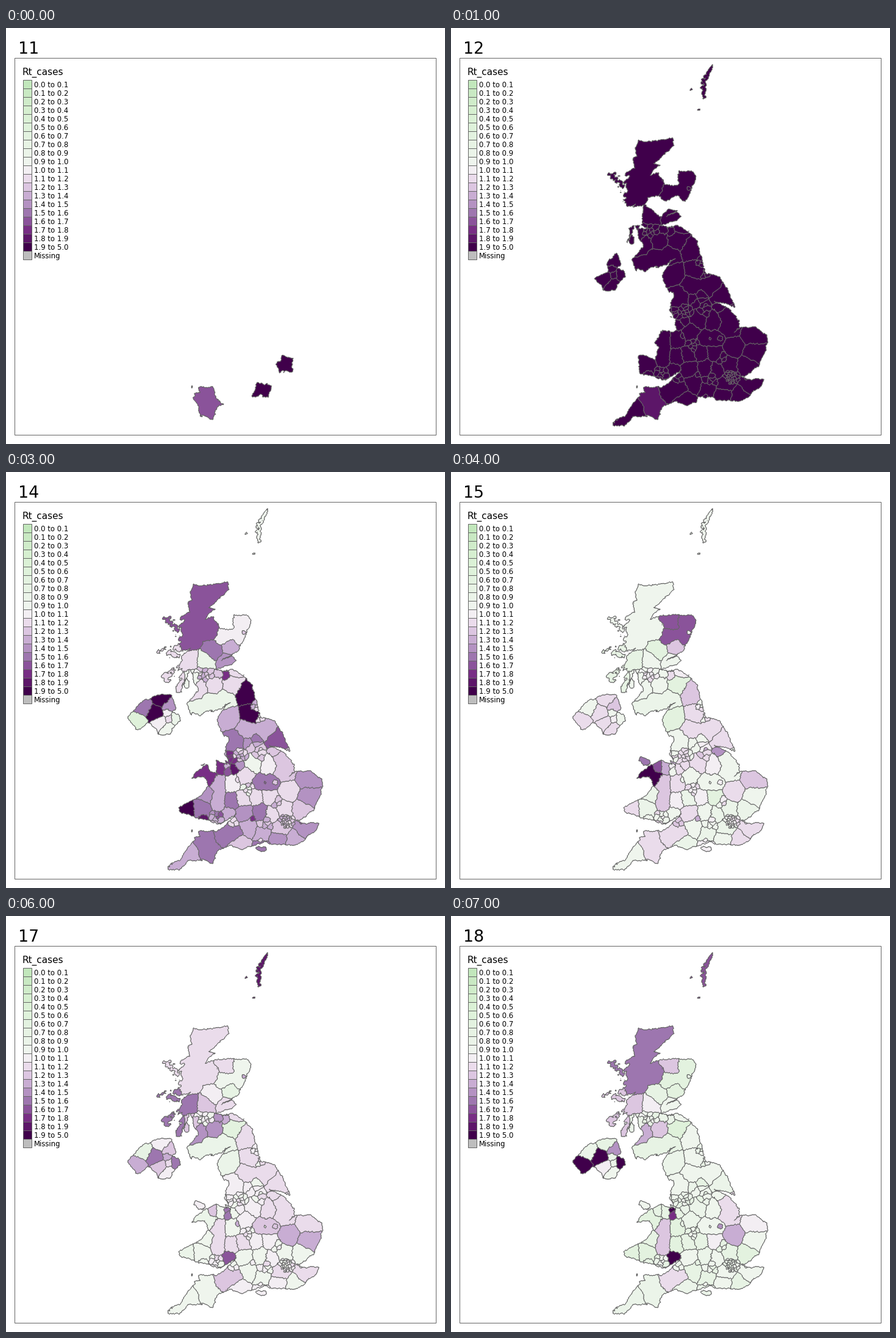
Animation of 720 by 681 pixels, one loop 8 s. Source, as a matplotlib script:

```python
import numpy as np
import matplotlib.pyplot as plt
from matplotlib.animation import FuncAnimation
from matplotlib.colors import LinearSegmentedColormap
from matplotlib.patches import Rectangle
from matplotlib.path import Path

W, H, DPI = 720, 681, 100
X0, X1, Y0, Y1, S = 192, 528, 54, 660, 3   # map window and supersampling
WEEKS = range(11, 19)
NONE = -1                                  # no data that week
USUAL = {11: NONE, 12: 19, 13: 19, 14: 12, 15: 10, 16: 10, 18: 8}
GREY = (0.4, 0.4, 0.4)
rng = np.random.default_rng(5)

# Diverging scale: 10 green classes below 1.0 and 10 purple ones above
purple = LinearSegmentedColormap.from_list(
    "p", ["#f7f7f7", "#e7d4e8", "#c2a5cf", "#9970ab", "#762a83", "#40004b"])
green = LinearSegmentedColormap.from_list("g", ["#f7f7f7", "#d9f0d3", "#a6dba0"])
SCALE = [green((0.25 + 0.133 * i) / 2)[:3] for i in range(9, -1, -1)]
SCALE += [purple((0.25 + 4.75 * i / 9) / 5)[:3] for i in range(10)]

rows, cols = (Y1 - Y0) * S, (X1 - X0) * S
gy, gx = np.mgrid[0:rows, 0:cols] / S
gx, gy = gx + X0, gy + Y0


def noise(cell, amp):
    """Smooth random field that changes over the given number of samples."""
    grid = rng.uniform(-amp, amp, (rows // cell + 2, cols // cell + 2))
    y, x = np.arange(rows) / cell, np.arange(cols) / cell
    iy, ix = y.astype(int), x.astype(int)
    fy, fx = (y - iy)[:, None], x - ix
    mix = grid[iy] * (1 - fy) + grid[iy + 1] * fy
    return mix[:, ix] * (1 - fx) + mix[:, ix + 1] * fx


# Bend the samples so that straight sides turn ragged; the west has sea lochs
west = np.clip((300 - gx) / 15, 0, 1) * np.clip((gy - 195) / 15, 0, 1) * np.clip((355 - gy) / 15, 0, 1)
wx = gx + (1 + west) * (noise(6, 1.3) + noise(20, 1.2))
wy = gy + (1 + west) * (noise(6, 1.3) + noise(20, 1.2))
loch = 2.5 * west * np.sin(0.6 * gy + 0.4 * gx)

land = np.zeros((rows, cols), bool)


def coast(*xy):
    pts = np.reshape(xy, (-1, 2))
    lo = ((pts.min(0) - (X0 + 9, Y0 + 9)) * S).astype(int).clip(0)
    hi = ((pts.max(0) - (X0 - 9, Y0 - 9)) * S).astype(int)
    box = np.s_[lo[1]:hi[1], lo[0]:hi[0]]
    bent = np.column_stack([(wx + loch)[box].ravel(), wy[box].ravel()])
    land[box] |= Path(pts).contains_points(bent).reshape(wx[box].shape)


def isle(x, y, rx, ry, tilt=0):
    t = np.linspace(0, 2 * np.pi, 16)
    u, v, a = rx * np.cos(t), ry * np.sin(t), np.radians(tilt)
    coast(np.column_stack([x + u * np.cos(a) - v * np.sin(a), y + u * np.sin(a) + v * np.cos(a)]))


# Scotland and the far north of England
coast(308,183, 317,186, 340,184, 365,180, 364,192, 348,209, 332,222, 343,224, 331,234,
      327,241, 345,235, 372,234, 397,235, 402,243, 395,262, 387,281, 379,294, 370,300,
      352,308, 370,302, 377,309, 368,316, 342,322, 358,327, 372,323, 390,334, 404,350,
      411,381, 418,402, 375,428, 364,432, 357,431, 345,406, 357,386, 368,377, 345,391,
      328,391, 318,398, 306,393, 304,398, 296,379, 302,372, 316,356, 306,340, 307,329,
      322,328, 310,321, 306,332, 301,323, 297,335, 293,340, 286,361, 278,360, 287,330,
      290,320, 281,326, 288,303, 303,288, 284,295, 270,286, 286,278, 280,268, 290,268,
      284,250, 292,244, 287,238, 301,229, 298,215, 304,210, 302,198)
# England and Wales
coast(364,430, 375,420, 418,402, 441,408, 454,428, 465,457, 452,451, 432,447, 455,458,
      471,478, 473,490, 463,499, 474,490, 497,489, 517,503, 520,514, 511,537, 503,553,
      486,567, 476,571, 492,575, 512,574, 511,585, 499,593, 488,603, 472,611, 434,609,
      424,604, 418,608, 398,613, 386,618, 366,611, 345,620, 342,632, 338,640, 322,635,
      300,635, 285,651, 266,650, 266,645, 286,634, 297,617, 310,603, 308,597, 318,596,
      316,587, 346,588, 360,577, 378,560, 350,576, 333,570, 315,566, 303,563, 287,558,
      283,549, 300,540, 322,528, 331,512, 326,498, 304,501, 311,492, 326,480, 345,472,
      362,479, 358,471, 366,474, 359,462, 361,448, 366,440)
# Northern Ireland
coast(200,402, 209,390, 226,372, 236,371, 247,364, 270,364, 279,387, 272,394, 285,398,
      285,407, 272,421, 270,429, 248,429, 246,420, 232,408, 220,422, 213,421, 205,410)
isle(265, 242, 8, 5, 45)
isle(276, 253, 11, 4, 55)
isle(274, 298, 10, 5, 20)
isle(254, 292, 10, 2, -25)
isle(264, 335, 6, 8)
isle(272, 328, 2.5, 10, 25)
isle(296, 347, 4.5, 8)
isle(317, 473, 9, 6, 30)
isle(419, 617, 9, 4)
isle(304, 587, 1.2, 2)
isle(393, 100, 1.5, 1.5)
isle(406, 133, 1.5, 1.5)
# Shetland: a string of islets, widest in the middle
for t in np.linspace(0, 1, 22):
    spread = 9 * np.sin(np.pi * t) ** 2
    isle(415 + 11 * t ** 2 + rng.uniform(-spread, spread / 2), 113 - 48 * t, 2.2, rng.uniform(2, 4.5), 20)

points, owners, classes = [], [], [[NONE] * len(WEEKS)]


def place(*xy, size=15, first=12, **known):
    """An area around its points; known holds classes like w14=16."""
    val = {}
    for w, usual in USUAL.items():
        shade = usual + (int(rng.integers(-1, 2)) if w > 13 else 0)
        val[w] = known.get(f"w{w}", shade if w >= first else NONE)
    val[17] = (val[16] + val[18]) // 2 + 1
    for x, y in np.reshape(xy, (-1, 2)):
        points.append((x, y, size))
        owners.append(len(classes))
    classes.append([val[w] for w in WEEKS])


def cluster(x, y, radius, n, **known):
    """A conurbation: n small areas spread over a disc in a sunflower pattern."""
    for k in range(n):
        r, a = radius * np.sqrt((k + 0.5) / n), 2.4 * k + rng.uniform(-0.4, 0.4)
        vary = {w: int(np.clip(v + rng.integers(-2, 3), 6, 19)) for w, v in known.items()}
        place(x + r * np.cos(a), y + r * np.sin(a), size=1.6 * radius / np.sqrt(n), **vary)


# Scotland
place(415, 90, w14=9, w15=9, w16=19, w18=16)
place(325, 205, 310, 240, 335, 258, 300, 275, 265, 245, w13=13, w14=16, w15=9, w16=5, w18=15)
place(302, 308, 283, 345, 270, 297, 264, 335, first=14, w15=7, w16=17, w18=12)
place(360, 246, first=15, w15=16, w16=9, w18=12)
place(386, 248, 382, 270, 358, 269, w14=10, w15=16, w16=11, w18=6)
place(390, 263, size=4, w16=17)
place(369, 286, first=14, w14=13, w15=12, w16=6, w18=6)
place(340, 292, first=14, w14=15, w15=6, w16=11)
place(325, 310, w14=8, w15=9, w16=12, w18=10)
place(362, 310, w14=14, w15=9, w16=11)
cluster(326, 330, 12, 10)
place(297, 348, 309, 338, w14=9, w15=9, w16=15)
place(308, 366, 318, 350, w15=9, w16=14, w18=13)
place(340, 348, w15=9, w16=14, w18=12)
place(310, 380, 335, 376, 358, 372, w14=8, w15=8, w16=8)
place(370, 347, w14=11, w15=6, w16=6, w18=5)
place(376, 328, size=10)
place(361, 335, size=7, w13=17, w14=17, w16=17)
place(347, 331, size=7, w16=19)

# Northern England
place(395, 362, w14=19, w15=12, w16=11)
place(400, 397, w14=19, w16=11)
cluster(408, 383, 6, 4)
place(367, 402, w13=15, w14=13, w15=6, w16=6)
place(395, 420, 425, 420, w14=13, w16=12)
cluster(418, 404, 5, 3)
place(445, 440, w14=16, w15=11, w16=12)
place(376, 440, w14=15, w15=9)
cluster(407, 446, 12, 5, w14=14)
cluster(415, 460, 9, 4, w15=13)
place(442, 456, size=10, w15=14)
place(452, 470, 456, 488, w18=11)
place(428, 480, w14=10, w16=11)
place(408, 478, w13=14, w14=9, w16=11)
cluster(378, 480, 9, 3, w14=16)
cluster(384, 464, 10, 10)
cluster(364, 466, 7, 5, w14=15)

# Midlands and the east
place(394, 498, w13=16, w14=11, w16=11)
place(370, 510, w14=10, w16=11, w18=6)
place(379, 504, size=5, w16=18)
place(389, 535, w14=11, w15=8, w16=14)
place(370, 538, w13=12, w14=15, w16=14, w18=6)
place(410, 532, w13=16, w14=11, w16=12)
cluster(396, 518, 9, 7, w13=17, w14=10)
place(416, 508, 432, 510, w13=8, w14=15, w15=9, w16=13)
place(424, 509, size=4, w13=8, w14=16)
place(432, 530, w15=6, w16=8, w18=10)
place(495, 503, w14=14, w15=12, w18=10)
place(497, 531, w13=17, w14=14, w16=16)
place(462, 523, w13=15, w18=13)
place(440, 508, size=6, w13=11, w18=14)
place(485, 553, w13=18, w15=8, w16=11, w18=6)
place(455, 552, w11=19, w13=17, w14=11, w15=8)
cluster(446, 543, 7, 3, w13=14)

# Southern England
place(436, 560, w13=16, w14=11, w15=8)
place(418, 557, w13=18, w14=15, w15=9, w16=8)
place(390, 557, w14=14, w15=11, w16=8)
place(398, 582, w13=15, w14=13, w16=9)
place(404, 568, size=5, w14=17, w15=13)
cluster(426, 575, 9, 5, w13=14)
cluster(374, 575, 6, 3, w15=13)
place(355, 592, 374, 592, w13=18, w14=15, w15=11, w16=12, w18=11)
place(383, 609, w13=18, w15=8, w16=11)
place(330, 600, 335, 622, w11=16, w12=18, w14=15, w15=11, w16=9, w18=8)
place(297, 628, 280, 640, w14=13, w15=9, w16=9, w18=8)
place(420, 590, w11=19, w13=16, w15=8)
place(417, 603, size=4)
place(420, 617, first=14, w14=15)
place(450, 583, w13=15, w15=8, w16=12)
place(447, 600, w13=16, w14=14, w15=9)
place(473, 602)
place(490, 583, w14=14, w15=11, w16=11)
place(484, 574, size=4, w14=16)
cluster(460, 571, 11, 30, w13=15)

# Wales
place(317, 472, first=15, w15=15)
place(333, 500, 316, 494, 325, 486, first=14, w14=17, w15=19, w16=9, w18=6)
place(338, 481, first=15, w15=16, w16=15)
place(352, 481, first=14, w14=17, w15=13)
place(359, 481, size=8, first=14, w18=19)
place(362, 489, size=8, first=14, w14=16, w18=17)
place(348, 510, 348, 537, w15=12, w16=9, w18=12)
place(327, 530, first=14, w14=14, w15=8)
place(296, 550, first=14, w14=19, w16=8, w18=6)
place(320, 548, w14=15, w15=8, w18=6)
cluster(345, 565, 9, 8, w13=15, w14=14)
place(323, 565, size=6, w14=18)
place(366, 557, size=10, w13=10, w18=19)

# Northern Ireland
place(215, 408, first=14, w14=5, w16=5, w18=19)
place(226, 386, first=14, w14=15, w15=9, w16=5)
place(256, 372, first=14, w14=19, w15=11, w16=12)
place(244, 395, first=14, w14=19, w15=11, w16=9, w18=19)
place(268, 383, w13=17, w14=14, w15=12, w18=14)
place(264, 393, size=9, w14=10, w16=16)
place(267, 404, size=8, w13=16, w16=13)
place(253, 411, w14=10, w15=11, w16=12, w18=10)
place(264, 420, w14=9, w15=11, w16=9)
place(281, 404, w14=8, w18=19)

# Every land sample belongs to the nearest point, weighted by size
px, py = wx[land], wy[land]
best = np.full(px.shape, np.inf)
owner = np.zeros(px.shape, int)
for (x, y, size), k in zip(points, owners):
    dist = np.hypot(px - x, py - y) / size
    near = dist < best
    best[near], owner[near] = dist[near], k
label = np.zeros(land.shape, int)
label[land] = owner
classes = np.array(classes)


def render(week):
    """Choropleth of one week with grey borders, averaged down to pixels."""
    vals = classes[:, week]
    lut = np.array([(1, 1, 1) if v < 0 else SCALE[v] for v in vals])
    shown = np.where(vals[label] >= 0, label, 0)
    edge = np.zeros(shown.shape, bool)
    for axis in (0, 1):
        for step in (-2, -1, 1, 2):
            edge |= shown != np.roll(shown, step, axis)
    rgb = lut[shown]
    rgb[edge] = GREY
    return rgb.reshape(Y1 - Y0, S, X1 - X0, S, 3).mean((1, 3))


fig = plt.figure(figsize=(W / DPI, H / DPI), dpi=DPI, facecolor="white")
ax = fig.add_axes([0, 0, 1, 1])
ax.axis("off")
picture = ax.imshow(render(0), extent=(X0, X1, Y1, Y0), interpolation="nearest", aspect="auto")
ax.set_xlim(0, W)
ax.set_ylim(H, 0)


def write(x, y, text, px):
    return ax.text(x, y, text, fontsize=px * 72 / DPI, family="DejaVu Sans", va="baseline")


def box(x, y, w, h, fill):
    ax.add_patch(Rectangle((x, y), w, h, fc=fill, ec=GREY, lw=0.72, snap=False))


box(14.5, 49.5, 691, 617, "none")
title = write(20, 42, "11", 26.7)
write(26, 77, "Rt_cases", 15.3)
names = [f"{i / 10:.1f} to {(i + 1) / 10:.1f}" for i in range(19)] + ["1.9 to 5.0", "Missing"]
for i, (name, fill) in enumerate(zip(names, SCALE + ["#bebebe"])):
    box(28.5, 85.5 + 14 * i, 14, 14, fill)
    write(45.5, 97 + 14 * i, name, 11.6)


def draw(i):
    picture.set_data(render(i))
    title.set_text(str(WEEKS[i]))
    return picture, title


anim = FuncAnimation(fig, draw, frames=len(WEEKS), interval=1000, repeat=True)
plt.show()
```
